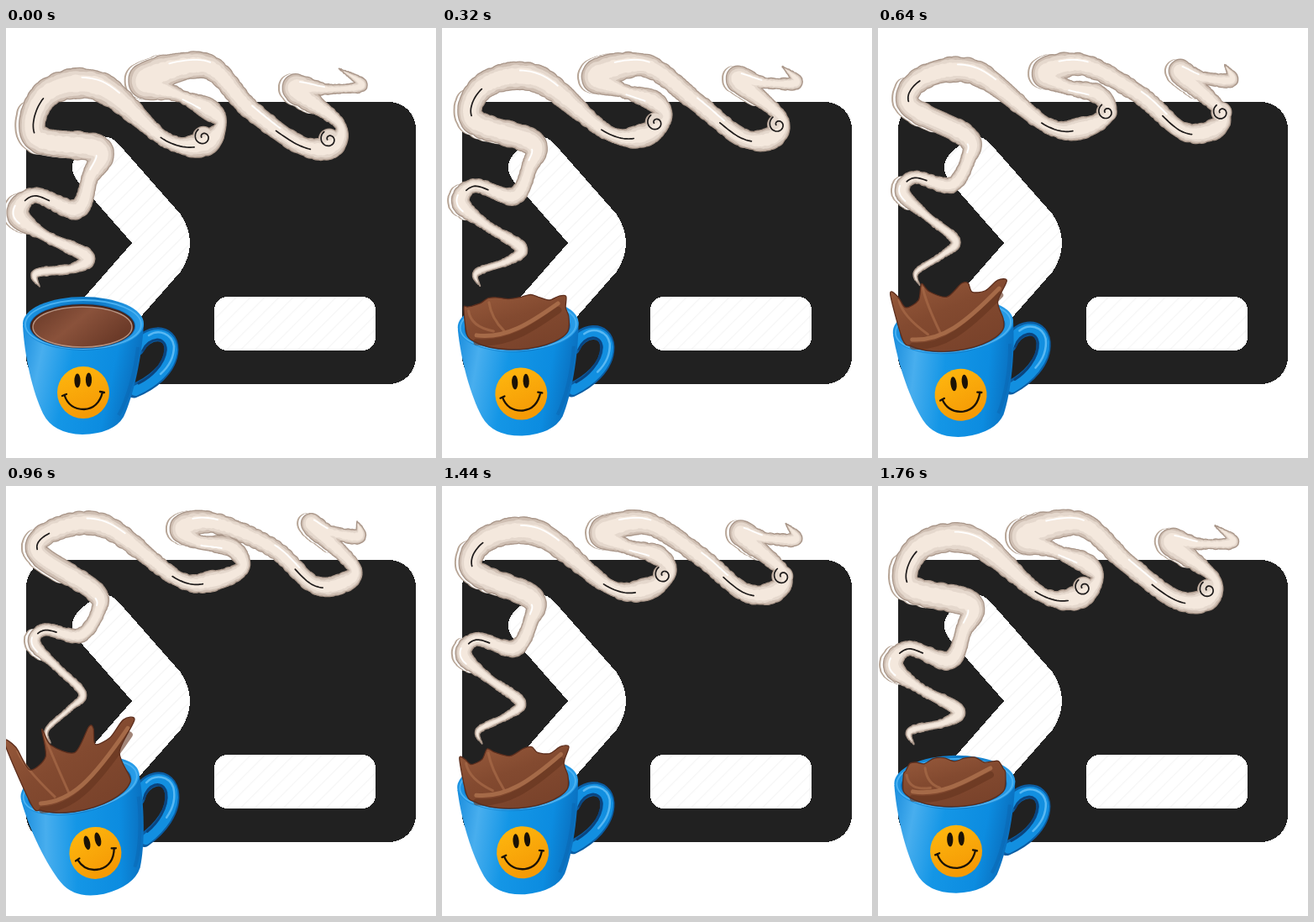
Recreate the animation shown at these times as an HTML page. Size 512x512 px, loop 1920 ms.

```html
<!DOCTYPE html>
<html lang="en">
<head>
<meta charset="utf-8">
<title>Terminal and coffee</title>
<style>
html, body { margin: 0; width: 100%; height: 100%; overflow: hidden; background: #fff; }
svg { display: block; width: 100%; height: 100%; }
</style>
</head>
<body>
<svg viewBox="0 0 512 512">
  <defs>
    <pattern id="stripes" width="12" height="12" patternUnits="userSpaceOnUse" patternTransform="rotate(45)">
      <rect width="12" height="12" fill="#fff"/>
      <rect width="1.2" height="12" fill="#f5f5f5"/>
    </pattern>
    <linearGradient id="body" x1="0" y1="0" x2="1" y2=".2">
      <stop offset="0" stop-color="#1a8ddd"/>
      <stop offset=".2" stop-color="#48aeee"/>
      <stop offset=".45" stop-color="#1496e6"/>
      <stop offset=".8" stop-color="#0c8ce0"/>
      <stop offset="1" stop-color="#0a6fbe"/>
    </linearGradient>
    <linearGradient id="rim" x1="0" x2="1">
      <stop offset="0" stop-color="#1c93e2"/>
      <stop offset=".6" stop-color="#0d78c4"/>
      <stop offset="1" stop-color="#2ba0ec"/>
    </linearGradient>
    <linearGradient id="coffee" x1="0" x2="1" y2=".5">
      <stop offset="0" stop-color="#673827"/>
      <stop offset=".5" stop-color="#8a523b"/>
      <stop offset="1" stop-color="#6b3a28"/>
    </linearGradient>
    <linearGradient id="splash" x1="0" y1="0" x2=".5" y2="1">
      <stop offset="0" stop-color="#96593b"/>
      <stop offset=".5" stop-color="#834a30"/>
      <stop offset="1" stop-color="#7a432b"/>
    </linearGradient>
    <linearGradient id="smile" x1="0" y1="0" x2=".4" y2="1">
      <stop offset="0" stop-color="#ffb90f"/>
      <stop offset="1" stop-color="#f59a05"/>
    </linearGradient>
  </defs>

  <g shape-rendering="crispEdges">
    <rect x="24" y="88" width="464" height="336" rx="32" fill="#212121"/>
    <path fill="url(#stripes)" d="M85 182Q72 165 87 148L104 134Q120 123 134 138L208 222Q230 256 208 290L134 374Q120 389 104 378L87 364Q72 347 85 330L150 256Z"/>
    <rect x="248" y="320" width="192" height="64" rx="16" fill="url(#stripes)"/>
  </g>

  <g id="smoke"></g>

  <g id="cup">
    <g fill="none" stroke-linecap="round">
      <path d="M64 30C74 8 105 6 105 31C104 55 80 72 60 80" stroke="#0b5da3" stroke-width="17"/>
      <path d="M65 28C75 9 105 6 106 31C105 54 82 71 62 80" stroke="#128fe0" stroke-width="12"/>
      <path d="M71 32C78 16 98 14 98 31C96 50 80 64 66 71" stroke="#0a4580" stroke-width="3"/>
      <path d="M78 14C90 6 106 12 108 27C108 40 101 52 92 60" stroke="#58b8f3" stroke-width="2.5"/>
    </g>
    <path fill="url(#body)" d="M-72 2C-70 40 -60 82 -48 107Q-36 131 -1 132Q36 131 48 111C60 85 70 40 72 0Z"/>
    <path d="M65 28C62 58 52 92 42 109" fill="none" stroke="#0a62ab" stroke-width="4" opacity=".4"/>
    <ellipse rx="72" ry="32" fill="url(#rim)"/>
    <ellipse cy="1" rx="69" ry="29" fill="none" stroke="#4bb2f2" stroke-width="1.8"/>
    <ellipse cx="-1" cy="3" rx="63" ry="27" fill="#0b62a8"/>
    <g id="calm">
      <ellipse cx="-1" cy="3" rx="62" ry="26" fill="#4a2519"/>
      <ellipse cx="-1" cy="4" rx="59" ry="24" fill="url(#coffee)" stroke="#b5917f" stroke-width="1.5"/>
    </g>
    <g id="wave"></g>
    <g transform="translate(0 82)">
      <circle r="31" fill="url(#smile)"/>
      <g fill="#1b1206">
        <ellipse cx="-7" cy="-14" rx="3.6" ry="8.5"/>
        <ellipse cx="6.5" cy="-15" rx="3.6" ry="8.5"/>
      </g>
      <path d="M-25 4L-20 2M20 -1L25 0M-22.5 3Q-17 20 1 20Q18 19 23 -.5" fill="none" stroke="#1b1206" stroke-width="2.3" stroke-linecap="round"/>
    </g>
  </g>
</svg>
<script>
const STEP = 160, STEPS = 12, HALF = 6;

// Smoke key points from the lower to the upper tip: calm x, y, risen x, y, width
const smokeKeys = [
  [40,308,53,306,1], [36,292,49,290,10], [80,286,76,265,11], [96,272,91,247,18],
  [46,247,62,217,13], [14,222,34,188,26], [34,199,46,171,17], [84,216,88,178,22],
  [100,178,110,148,20], [110,145,104,124,32], [35,130,38,80,31], [48,78,56,53,32],
  [112,70,118,48,34], [190,133,204,110,17], [236,138,246,113,28], [256,114,282,97,13],
  [242,97,268,73,24], [206,80,228,66,15], [166,62,210,50,40], [238,45,248,44,28],
  [290,96,318,74,23], [350,139,366,117,21], [388,141,402,115,26], [397,114,414,96,13],
  [344,72,364,46,30], [386,73,386,55,11], [424,68,420,60,13], [396,48,418,42,1]];
// Crown of the splash at full height, relative to the rim centre
const crown = [[-76,-70], [-64,-62], [-54,-32], [-32,-43], [-29,-76], [-23,-55], [3,-40], [26,-66],
  [31,-63], [29,-44], [48,-48], [68,-65], [81,-62], [55,-29], [60,2]];
// Places along the smoke, counted in key points
const leftTurns = [5, 10, 18, 24], inkSpots = [6, 10.5, 13.3, 20.9];
const glintSpots = [5, 8.5, 12, 16.6, 18.8, 20.3, 24.6], curlSpots = [14.3, 22.3];

const $ = id => document.getElementById(id);
const lerp = (a, b, t) => a + (b - a) * t;
const fix = v => v.toFixed(1);
const pair = p => p.map(fix).join(" ");
const fill = (d, color) => `<path d="${d}" fill="${color}"/>`;
const stroke = (d, color, w, opacity = 1) =>
  `<path d="${d}" fill="none" stroke="${color}" stroke-width="${w}" stroke-linecap="round" opacity="${opacity}"/>`;

function spline(a, b, c, d, t) {
  return b + t / 2 * (c - a + t * (2 * a - 5 * b + 4 * c - d + t * (3 * (b - c) + d - a)));
}

function sampleAt(pts, u) {
  const i = Math.min(Math.floor(u), pts.length - 2);
  const at = n => pts[Math.max(0, Math.min(pts.length - 1, n))];
  return pts[0].map((_, n) => spline(at(i - 1)[n], at(i)[n], at(i + 1)[n], at(i + 2)[n], u - i));
}

function dot(x, y, r) {
  if (r <= 0.2) return "";
  const half = `a${fix(r)} ${fix(r)} 0 1 0 `;
  return `M${fix(x - r)} ${fix(y)}${half}${fix(2 * r)} 0${half}${fix(-2 * r)} 0z`;
}

function ribbon(pts, from, to, radius, shift = 0) {
  let d = "";
  for (let u = from; u <= to; u += 1 / 30) {
    const [x, y, w] = sampleAt(pts, u);
    d += dot(x + shift, y, radius(w / 2));
  }
  return d;
}

// Short line that follows the ribbon, set off by a share of its half width
function along(pts, mid, reach, side) {
  const line = [];
  for (let u = mid - reach; u <= mid + reach; u += 0.05) {
    const [x, y, w] = sampleAt(pts, u), [x2, y2] = sampleAt(pts, u + 0.02);
    const off = side * w / 2 / (Math.hypot(x2 - x, y2 - y) || 1);
    line.push(pair([x - (y2 - y) * off, y + (x2 - x) * off]));
  }
  return "M" + line.join("L");
}

function curl([x, y, r]) {
  if (r < 3) return "";
  const line = [];
  for (let a = 0; a <= 7.6; a += 0.2) {
    const q = r * (0.2 + 0.8 * a / 7.6);
    line.push(pair([x + q * Math.cos(a + 3), y + q * Math.sin(a + 3)]));
  }
  return "M" + line.join("L");
}

function drawSmoke(k) {
  const t = 1 - (1 - k / HALF) ** 1.3;
  const pts = smokeKeys.map(([x0, y0, x1, y1, w], i) => {
    const thin = (w + 19) / 2 * Math.min(1, 0.3 + i / 14);
    return [lerp(x0, x1, t), lerp(y0, y1, t), w < 2 ? w : lerp(w, thin, t)];
  });
  const curls = curlSpots.map(u => {
    const [x, y] = sampleAt(pts, u + 0.8 * t);
    return [x - 10 * (1 - t), y - 3, 11 * Math.min(1, 4 * (1 - t))];
  });
  const echo = shift => leftTurns.map(u => ribbon(pts, u - 0.5, u + 0.5, r => r, -shift)).join("");
  const layer = radius => ribbon(pts, 0, pts.length - 1, radius);
  const balls = grow => curls.map(([x, y, r]) => r > 3 ? dot(x, y, r + grow) : "").join("");
  const lines = (spots, reach, side) => spots.map(u => along(pts, u, reach, side)).join("");
  $("smoke").innerHTML =
    fill(echo(5), "#b7a596") + fill(echo(3), "#fff") +
    fill(layer(r => r + 0.3) + balls(2), "#a99689") +
    fill(layer(r => r - 1) + balls(1), "#cfbfb3") +
    fill(layer(r => r * 0.85 - 1) + balls(0), "#e5d8cd") +
    fill(layer(r => r * 0.6 - 0.8), "#f4e8dd") +
    stroke(lines(glintSpots, 0.3, -0.4), "#fff", 1.8) +
    stroke(lines(inkSpots, 0.38, 0.1) + curls.map(curl).join(""), "#1d1a1a", 1.7);
}

function closed(pts) {
  const n = pts.length, at = i => pts[(i + n) % n];
  let d = "M" + pair(at(0));
  for (let i = 0; i < n; i++) {
    const [a, b, c, e] = [at(i - 1), at(i), at(i + 1), at(i + 2)];
    const out = b.map((v, j) => v + (c[j] - a[j]) / 7), back = c.map((v, j) => v - (e[j] - b[j]) / 7);
    d += `C${pair(out)} ${pair(back)} ${pair(c)}`;
  }
  return d + "z";
}

function splash(t) {
  const last = crown.length - 1;
  const top = crown.map(([x, y], i) => {
    const a = Math.PI * (i + 0.5) / (last + 1);
    const calmY = 3 - 31 * Math.sin(a) ** 0.35 + 3 * Math.sin(2 * i);
    return [lerp(-61 * Math.cos(a), x, t), lerp(calmY, y, t)];
  });
  const rim = [];
  for (let a = 0.25; a < 3.1; a += 0.38) rim.push([62 * Math.cos(a) - 1, 3 + 26 * Math.sin(a)]);
  const near = (i, dx, dy) => pair([top[i][0] + dx, top[i][1] + dy]);
  const sweep = dy => `M-50 ${10 + dy}C-15 ${16 + dy} 15 ${-2 + dy} ${near(12, -10, 8 + dy)}`;
  const fall = i => `M${near(i, 1, 5)}Q${near(i, 3, 24)} ${lerp(top[i][0], 0, 0.5)} 6`;
  return fill(closed([...top, ...rim]), "url(#splash)") +
    stroke(sweep(8), "#64351f", 8, 0.6) + stroke(sweep(0), "#b27651", 5, 0.75) +
    stroke(fall(4), "#a86c49", 3, 0.7) + stroke(fall(1), "#a86c49", 3, 0.7) +
    stroke(closed([...top, ...rim]), "#5d2e1d", 1.3);
}

function drawCup(k) {
  const t = k / HALF, tilt = 7 * t + 6 * t ** 3;
  $("cup").setAttribute("transform", `translate(${92 - 4 * t} ${352 + 5 * t}) rotate(${-tilt})`);
  $("calm").style.display = k ? "none" : "";
  $("wave").innerHTML = k ? splash((k - 1) / (HALF - 1)) : "";
}

let shown = -1;
function frame(now) {
  const step = Math.floor(now / STEP) % STEPS;
  if (step !== shown) {
    shown = step;
    const k = step <= HALF ? step : STEPS - step;
    drawSmoke(k);
    drawCup(k);
  }
  requestAnimationFrame(frame);
}
frame(0);
</script>
</body>
</html>
```
